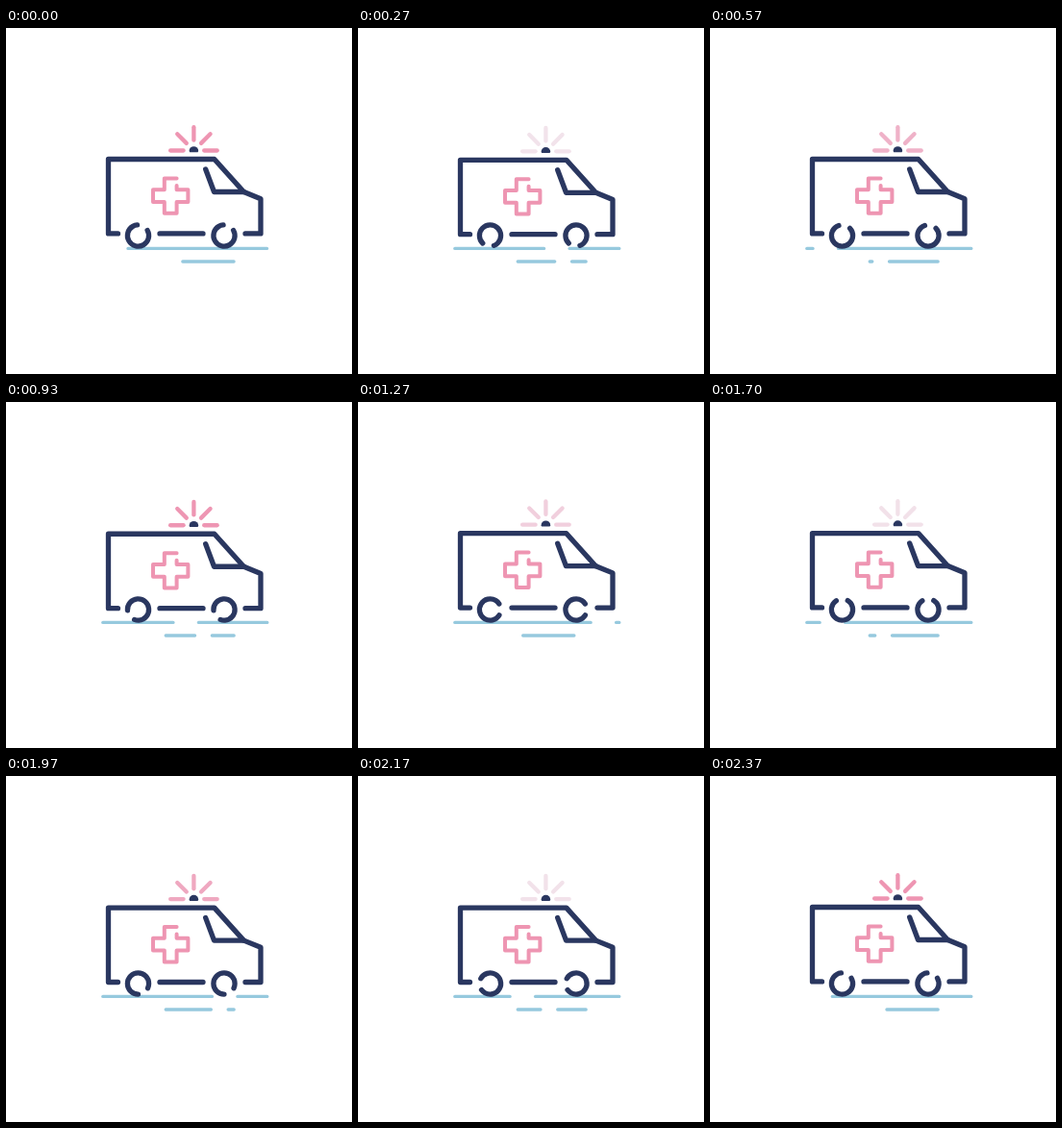
Recreate the animation shown at these times as an HTML page with a canvas. Size 360x360 px, loop 2.4 s.

```html
<!DOCTYPE html>
<html lang="en">
<head>
<meta charset="utf-8">
<title>Ambulance</title>
<style>
  html, body { margin: 0; width: 100%; height: 100%; overflow: hidden; background: #fff; }
  canvas { display: block; width: 360px; height: 360px; }
</style>
</head>
<body>
<canvas id="stage"></canvas>
<script>
const SIZE = 360, LOOP = 2400, DRIVE = 2370;
const TURNS = 4, FLASHES = 5;
const NAVY = '#2a3760', BLUE = '#96c9de', PINK = [238, 149, 178], DIM = [242, 231, 238];
const TAU = Math.PI * 2;

const canvas = document.getElementById('stage');
const ctx = canvas.getContext('2d');
const ratio = window.devicePixelRatio || 1;
canvas.width = canvas.height = SIZE * ratio;

const mix = (from, to, k) => `rgb(${from.map((v, i) => Math.round(v + (to[i] - v) * k))})`;

// Steady rolling with a slight surge after the middle of the drive
function turnsAt(t) {
  const surge = 0.07 * Math.exp(-(((t - 1550) / 300) ** 2));
  return TURNS * t / DRIVE + surge * (1 - t / DRIVE) ** 0.05;
}

function pen(color, width) {
  ctx.strokeStyle = color;
  ctx.lineWidth = width;
}

function line(...points) {
  ctx.beginPath();
  points.forEach(([x, y]) => ctx.lineTo(x, y));
  ctx.stroke();
}

// Straight line with one gap that travels left and wraps around
function road(x, y, length, gap, phase) {
  const start = (1 - phase) % 1;
  for (const shift of [0, -1]) {
    const from = Math.max(0, start + gap + shift);
    const to = Math.min(1, start + 1 + shift);
    if (to - from > 0.005) line([x + from * length, y], [x + to * length, y]);
  }
}

function wheel(x, y, phase) {
  const gapCentre = (phase + 0.075) * TAU - TAU / 4;
  const half = 0.09 * TAU;
  ctx.beginPath();
  ctx.arc(x, y, 11.1, gapCentre + half, gapCentre - half + TAU);
  ctx.stroke();
}

function siren(x, y, glow) {
  pen(mix(DIM, PINK, glow), 4.3);
  for (let i = 0; i <= 4; i++) {
    const angle = Math.PI * (1 + i / 4);
    const ray = r => [x + r * Math.cos(angle), y + r * Math.sin(angle)];
    line(ray(10.8), ray(24.3));
  }
  ctx.fillStyle = NAVY;
  ctx.beginPath();
  ctx.arc(x, y + 0.5, 4.8, Math.PI, TAU);
  ctx.lineTo(x + 4.2, y + 1.8);
  ctx.lineTo(x - 4.2, y + 1.8);
  ctx.fill();
}

function van() {
  const top = 136.5, mid = 170.5, floor = 213.9, back = 106.5, front = 265;
  pen(NAVY, 5.3);
  line([116.5, floor], [back, floor], [back, top], [216.8, top],
       [247.4, mid], [front, 177.7], [front, floor], [249, floor]);
  line([207.7, 147], [216.5, mid], [247.4, mid]);
  line([160, floor], [205, floor]);
}

// Each arm is the previous one turned a quarter; the outline stays open at the end
function cross(x, y, arm, reach) {
  const points = [];
  let corner = [[arm, -reach], [-arm, -reach], [-arm, -arm]];
  for (let i = 0; i < 4; i++) {
    points.push(...corner);
    corner = corner.map(([px, py]) => [py, -px]);
  }
  points.push([arm, -arm - 4.2]);
  pen(mix(DIM, PINK, 1), 4);
  line(...points.map(([px, py]) => [x + px, y + py]));
}

function draw(t) {
  const phase = turnsAt(t) % 1;
  const bob = 0.4 * (1 - Math.cos(phase * TAU));
  const glow = 0.5 + 0.5 * Math.cos(FLASHES * t / DRIVE * TAU);

  ctx.setTransform(ratio, 0, 0, ratio, 0, 0);
  ctx.fillStyle = '#fff';
  ctx.fillRect(0, 0, SIZE, SIZE);
  ctx.lineCap = ctx.lineJoin = 'round';

  pen(BLUE, 3.3);
  road(100.8, 229.4, 171, 0.155, phase);
  road(166.2, 243, 71, 0.25, phase);

  ctx.save();
  ctx.translate(0, bob);
  siren(195.4, 127.5, glow);
  van();
  cross(171.2, 174.6, 6.4, 18.2);
  ctx.restore();

  pen(NAVY, 5.3);
  wheel(137.5, 216, phase);
  wheel(227, 216, phase);
}

const begin = performance.now();
function tick() {
  draw(Math.min((performance.now() - begin) % LOOP, DRIVE));
  requestAnimationFrame(tick);
}
tick();
</script>
</body>
</html>
```
